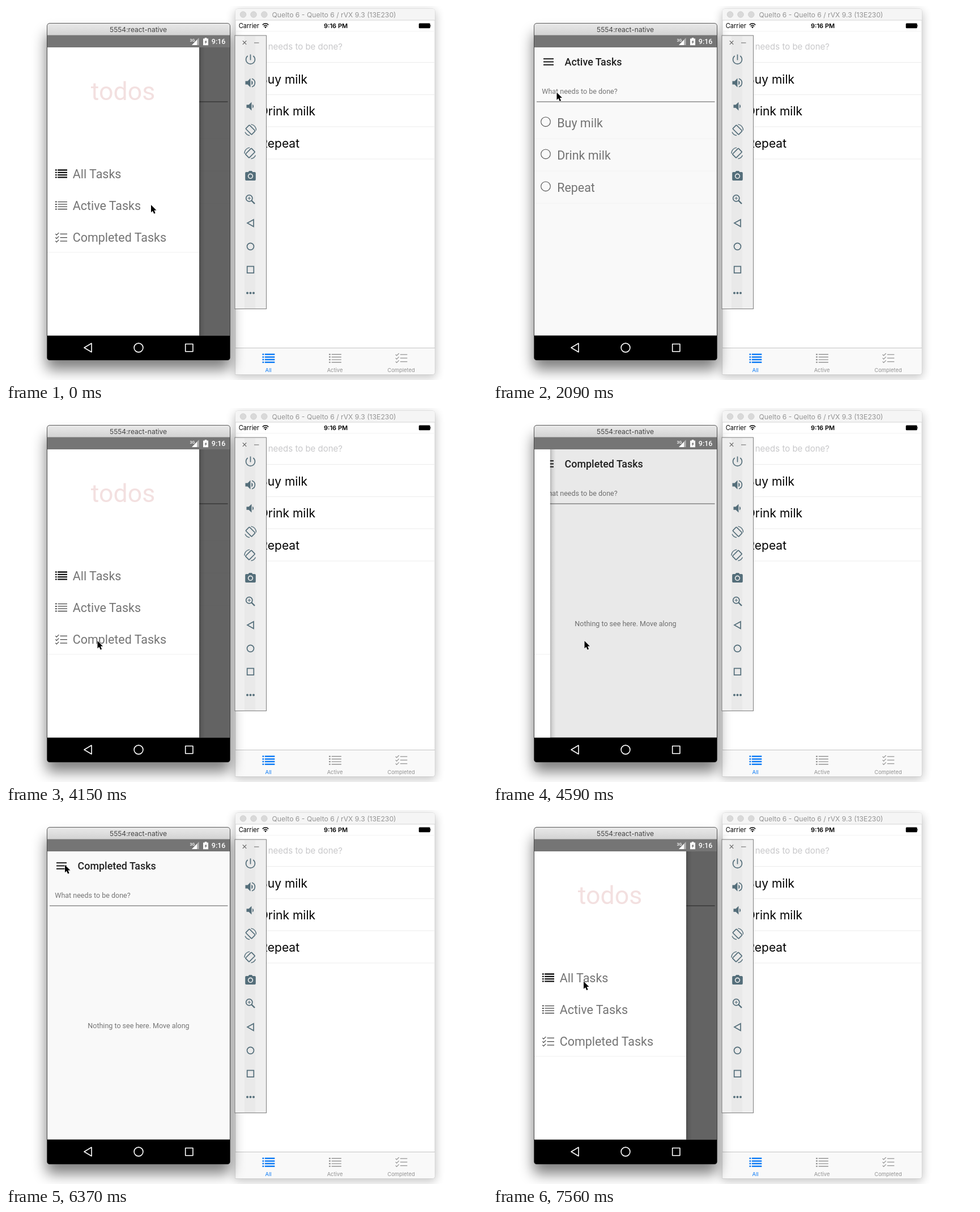
An HTML page that plays this animation: 849x660 px, repeating every 8000 ms.

```html
<!DOCTYPE html>
<html lang="en">
<head>
<meta charset="utf-8">
<title>Todos</title>
<style>
html, body { margin: 0; width: 100%; height: 100%; overflow: hidden; background: #fff; }
svg { display: block; width: 849px; height: 660px; }
.ui { font-family: Inter, sans-serif; }
.droid { font-family: Roboto, sans-serif; }
.item { font-size: 21.46px; fill: #747474; }
.small { font-size: 12.5px; fill: #757575; }
.task { font-size: 21px; text-anchor: end; fill: #000; }
.tab { font-size: 9.4px; text-anchor: middle; }
.line { fill: none; stroke: #546e7a; stroke-width: 1.7; }
.solid { fill: #546e7a; }
</style>
</head>
<body>
<svg viewBox="0 0 849 660" xmlns="http://www.w3.org/2000/svg">
  <defs>
    <filter id="soft" x="-20%" y="-20%" width="140%" height="140%"><feGaussianBlur stdDeviation="12"/></filter>
    <filter id="faint" x="-20%" y="-20%" width="140%" height="140%"><feGaussianBlur stdDeviation="8"/></filter>
    <linearGradient id="bar" x2="0" y2="1"><stop stop-color="#e9e9e9"/><stop offset="1" stop-color="#d2d2d2"/></linearGradient>
    <linearGradient id="edge"><stop stop-opacity=".24"/><stop offset=".35" stop-opacity=".1"/><stop offset="1" stop-opacity="0"/></linearGradient>
    <clipPath id="screen"><rect x="73" y="73" width="322" height="508.500"/></clipPath>
    <g id="bold">
      <path d="M0 1.200h2.700M0 5.500h2.700M0 9.800h2.700M0 14.100h2.700M4.200 1.200H21M4.200 5.500H21M4.200 9.800H21M4.200 14.100H21" fill="none" stroke="currentColor" stroke-width="2.300"/>
    </g>
    <g id="thin">
      <path d="M0 1.200h2.700M0 5.500h2.700M0 9.800h2.700M0 14.100h2.700" fill="none" stroke="currentColor" stroke-width="2"/>
      <path d="M4.500 1.200H21M4.500 5.500H21M4.500 9.800H21M4.500 14.100H21" fill="none" stroke="currentColor" stroke-width="1.300"/>
    </g>
    <g id="checks">
      <path d="M.3 1.500l2 2L6.300 -.5M.3 7.700l2 2 4-4M.3 13.900l2 2 4-4M8.500 1.700H21M8.500 7.900H21M8.500 14.100H21" fill="none" stroke="currentColor" stroke-width="1.200"/>
    </g>
  </defs>

  <!-- phone on the right -->
  <g class="ui">
    <rect x="403" y="8" width="356" height="648" rx="8" opacity=".22" filter="url(#faint)"/>
    <path d="M405 650.500V9a4 4 0 0 1 4-4H753a4 4 0 0 1 4 4V646a4 4 0 0 1-4 4.500Z" fill="#fff" stroke="#c9c9c9" stroke-width=".7"/>
    <path d="M405 25V9a4 4 0 0 1 4-4H753a4 4 0 0 1 4 4V25Z" fill="#f5f5f5"/>
    <path d="M405 25H757" stroke="#d4d4d4"/>
    <g fill="#d9d9d9" stroke="#c9c9c9" stroke-width=".7">
      <circle cx="418.500" cy="15" r="5.300"/><circle cx="437" cy="15" r="5.300"/><circle cx="455.800" cy="15" r="5.300"/>
    </g>
    <text x="469.500" y="19.700" font-size="12.200" fill="#949494">Quelto 6 - Quelto 6 / rVX 9.3 (13E230)</text>
    <text x="410.700" y="38.800" font-size="11.100">Carrier</text>
    <g fill="none" stroke="#000" stroke-width="1.500">
      <path d="M452.700 33.300a7.500 7.500 0 0 1 10.600 0M454.800 35.600a4.500 4.500 0 0 1 6.400 0"/>
    </g>
    <path d="M456.200 37.200a2.500 2.500 0 0 1 3.600 0L458 39.300Z"/>
    <text x="582" y="38.800" font-size="11" font-weight="600" text-anchor="middle">9:16 PM</text>
    <rect x="728.700" y="30.500" width="20" height="8.800" rx="1.500"/>
    <path d="M749.400 33.200q1.600 1.600 0 3.400Z"/>
    <text x="594" y="76.700" font-size="15" text-anchor="end" fill="#c8c8ca">What needs to be done?</text>
    <path d="M405 44.500H757" stroke="#f3f3f3"/>
    <path d="M406 99.500H757M406 156.500H757M406 213H757M406 270H757" stroke="#ececec"/>
    <text class="task" x="532" y="136.700">Buy milk</text>
    <text class="task" x="546" y="193.300">Drink milk</text>
    <text class="task" x="518" y="250">Repeat</text>
    <path d="M405.500 603.500H756.500V646a4 4 0 0 1-4 4H405.500Z" fill="#f9f9f9"/>
    <path d="M405 603.500H757" stroke="#c4c4c4"/>
    <g color="#0f7cf5"><use href="#bold" transform="translate(452.500 613.500) scale(1.040 1.080)"/></g>
    <g color="#949494">
      <use href="#thin" transform="translate(570 613.500) scale(1.040 1.080)"/>
      <use href="#checks" transform="translate(687.300 613.500)"/>
    </g>
    <text class="tab" x="463" y="646.300" fill="#0f7cf5">All</text>
    <text class="tab" x="580.500" y="646.300" fill="#929292">Active</text>
    <text class="tab" x="697.500" y="646.300" fill="#929292">Completed</text>
  </g>

  <!-- phone on the left -->
  <rect x="71" y="48" width="326" height="594" rx="8" opacity=".5" filter="url(#soft)"/>
  <rect x="72.500" y="30.500" width="323" height="594.500" rx="4.500" fill="#000" stroke="#000" stroke-opacity=".25"/>
  <path d="M73 52V35a4 4 0 0 1 4-4H391a4 4 0 0 1 4 4V52Z" fill="url(#bar)"/>
  <text class="ui" x="233.500" y="45.900" font-size="12" text-anchor="middle" fill="#444">5554:react-native</text>
  <rect x="73" y="51.500" width="322" height="22" fill="#757575"/>
  <g class="droid" fill="#fff" font-weight="500">
    <text x="324.500" y="62.500" font-size="7">3G</text>
    <path d="M340.500 56V69H328Z" fill-opacity=".45"/>
    <path d="M337 59.700V69H328Z"/>
    <path d="M350.800 56h3.400v1.400H357V69.200H348V57.400h2.800Z"/>
    <path d="M353.700 59.500l-3.400 4.800h2l-.8 3.200 3.500-4.900h-2.100Z" fill="#757575"/>
    <text x="362.800" y="66.900" font-size="12.500">9:16</text>
  </g>
  <g class="droid" clip-path="url(#screen)">
    <rect x="73" y="73" width="322" height="509" fill="#f9f9f9"/>
    <path d="M89 93.200h18M89 98.500h18M89 103.800h18" stroke="#1c1c1c" stroke-width="1.900"/>
    <text id="title" x="126.600" y="104.900" font-size="17.900" font-weight="500" fill="#212121"></text>
    <text class="small" x="86.300" y="154.500">What needs to be done?</text>
    <path d="M77 169H391.500" stroke="#8c8c8c" stroke-width="1.300"/>
    <g id="list"></g>
    <text id="empty" class="small" x="234" y="384.500" text-anchor="middle">Nothing to see here. Move along</text>
    <rect id="scrim" x="73" y="73" width="322" height="509"/>
    <g id="drawer">
      <rect x="341" y="73" width="10" height="509" fill="url(#edge)"/>
      <rect x="73" y="73" width="268" height="509" fill="#fff"/>
      <rect id="press" x="73" width="268" height="56" fill="#cacaca"/>
      <text x="206.500" y="165.700" font-size="44.700" text-anchor="middle" fill="#f3e0e0">todos</text>
      <g color="#111"><use href="#bold" transform="translate(87 288.300)"/></g>
      <g color="#444"><use href="#thin" transform="translate(87 344.400)"/><use href="#checks" transform="translate(87 400.700)"/></g>
      <text class="item" x="117.700" y="303.600">All Tasks</text>
      <text class="item" x="117.700" y="359.700">Active Tasks</text>
      <text class="item" x="117.700" y="415.700">Completed Tasks</text>
      <path d="M73 434.700H341" stroke="#f0f0f0"/>
    </g>
  </g>
  <g fill="none" stroke="#fff" stroke-width="1.600" stroke-linejoin="round">
    <path d="M151 595.300V610.700L138 603Z"/>
    <circle cx="234" cy="603" r="7.900"/>
    <rect x="316.700" y="596.500" width="13.200" height="13.200"/>
  </g>

  <!-- emulator tools -->
  <rect x="404" y="52" width="55.500" height="482.500" fill="#efefef" stroke="#7d7d7d"/>
  <rect x="421" y="53" width="19" height="481" fill="#e9e9e9"/>
  <path d="M417.800 61.300l6.500 6.500m0-6.500l-6.500 6.500M438 65h8.500" fill="none" stroke="#666" stroke-width="1.200"/>
  <g transform="translate(431.500 94.500)" class="line" stroke-width="2"><path d="M0-9V1M-4.800-6.500a8 8 0 1 0 9.600 0"/></g>
  <g transform="translate(431.500 135.500)">
    <path class="solid" d="M-9-3h4L0-8V8L-5 3h-4ZM1.800-4a4.500 4.500 0 0 1 0 8Z"/>
    <path class="line" d="M2.500-7.200a7.500 7.500 0 0 1 0 14.400"/>
  </g>
  <path class="solid" transform="translate(431.500 177)" d="M-7-2.800h4L2-7.500V7.500L-3 2.800h-4ZM3.600-3.600a4.200 4.200 0 0 1 0 7.200Z"/>
  <g id="turn" class="line" transform="translate(431.500 218.500)">
    <rect x="-4.600" y="-7.400" width="9.200" height="14.800" rx="1" transform="rotate(-45)"/>
    <path d="M1-9.600A10 10 0 0 1 10 1M-1.500 10A10 10 0 0 1-9.500 4" stroke-width="1.400"/>
  </g>
  <use href="#turn" transform="translate(862.500 41) scale(-1 1)"/>
  <path class="solid" d="M424 293h3.500l1.700-2h4.600l1.700 2h3.500a1.800 1.800 0 0 1 1.800 1.800v11.400a1.800 1.800 0 0 1-1.800 1.800H424a1.800 1.800 0 0 1-1.800-1.800v-11.400a1.800 1.800 0 0 1 1.800-1.800Z"/>
  <circle cx="431.500" cy="300.300" r="3.900" fill="#546e7a" stroke="#efefef" stroke-width="1.600"/>
  <g class="line"><circle cx="429.300" cy="339.300" r="5.600"/><path d="M433.500 343.500l5.500 5.500" stroke-width="2.400"/><path d="M426.500 339.300h5.600M429.300 336.500v5.600" stroke-width="1.100"/></g>
  <g class="line" stroke-width="1.500">
    <path d="M437 377V389.200L426 383.100Z"/>
    <circle cx="431.500" cy="424.300" r="6"/>
    <rect x="425.700" y="459.500" width="11.600" height="11.600"/>
  </g>
  <g class="solid"><circle cx="426" cy="506.500" r="2"/><circle cx="431.500" cy="506.500" r="2"/><circle cx="437" cy="506.500" r="2"/></g>

  <path id="cursor" d="M0 0V13.200L3 10.500 5.200 15.600 7.600 14.600 5.400 9.600H9.500Z" stroke="#fff" stroke-width="1.100" paint-order="stroke"/>
</svg>
<script>
const LOOP = 8000, STEP = 148.1, START = 590, WIDTH = 268;
const el = id => document.getElementById(id);
const show = (id, on) => el(id).setAttribute('visibility', on ? 'visible' : 'hidden');

el('list').innerHTML = ['Buy milk', 'Drink milk', 'Repeat'].map((name, i) => `
  <g transform="translate(0 ${i * 57})">
    <circle cx="93" cy="204.300" r="8.300" fill="none" stroke="#505050" stroke-width="1.100"/>
    <text class="item" x="113.200" y="213.500">${name}</text>
    <path d="M73 234H395" stroke="#f2f2f2"/>
  </g>`).join('');

// pointer path: step, x, y
const path = [
  [-1, 256, 351], [0, 203, 349], [1, 190, 348.500], [6, 190, 348.500],
  [10, 112.500, 152.500], [12, 95.500, 114], [15, 95.500, 96], [18, 97, 105],
  [19, 133.500, 325.500], [22, 158, 400], [24, 161.500, 411], [30, 161.500, 411],
  [33, 183, 474], [36, 110, 38], [39, 104, 97], [42, 104, 97],
  [45, 150, 280], [47, 160, 302.500]
];

function pointer(n) {
  const i = path.findIndex(p => p[0] >= n);
  if (i < 0) return path[path.length - 1].slice(1);
  if (i === 0) return path[0].slice(1);
  const a = path[i - 1], b = path[i], k = (n - a[0]) / (b[0] - a[0]);
  return [1, 2].map(j => a[j] + (b[j] - a[j]) * k);
}

// drawer settling: quintic ease-out over 512 ms
function settle(n, from) {
  const k = Math.min(1, Math.max(0, (n - from) * STEP / 512));
  return 1 - (1 - k) ** 5;
}

function render(t) {
  // the screen refreshes in steps
  const n = Math.max(-1, Math.floor((t - START) / STEP));
  const open = 1 - settle(n, 4.53) + settle(n, 17.89) - settle(n, 25.74) + settle(n, 41.89);
  const done = n >= 26;

  el('title').textContent = done ? 'Completed Tasks' : n >= 5 ? 'Active Tasks' : 'All Tasks';
  show('list', !done);
  show('empty', done);
  el('scrim').setAttribute('fill-opacity', 0.6 * open);
  el('drawer').setAttribute('transform', `translate(${(open - 1) * WIDTH} 0)`);
  show('drawer', open > 0.002);

  show('press', n === 5 || n === 26);
  el('press').setAttribute('y', done ? 379 : 323);

  const [x, y] = pointer(n);
  el('cursor').setAttribute('transform', `translate(${x} ${y})`);
  show('cursor', n < 34 || n > 35);
}

const t0 = performance.now();
function tick() {
  render((performance.now() - t0) % LOOP);
  requestAnimationFrame(tick);
}
tick();
</script>
</body>
</html>
```
